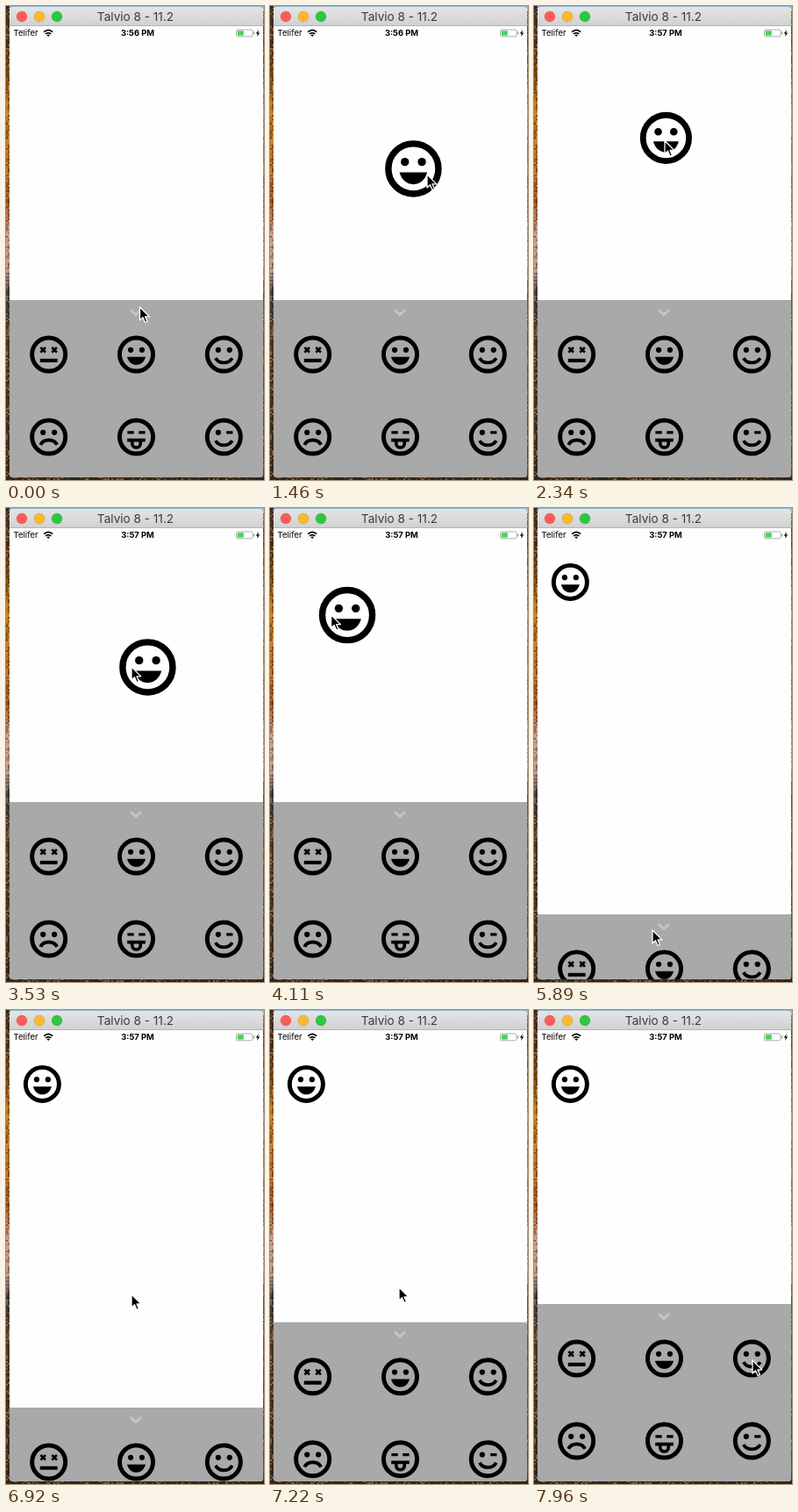
Write an HTML page that moves like this. It is 294 px wide and 540 px high and loops after 8000 ms.

```html
<!DOCTYPE html>
<html lang="en">
<head>
<meta charset="utf-8">
<title>Emoji canvas</title>
<style>
  html, body { margin: 0; width: 100%; height: 100%; overflow: hidden; }
  svg { display: block; width: 100vw; height: 100vh; }
  text { font-family: Inter, "Open Sans", sans-serif; }
  .line { fill: none; stroke: #000; }
  .button { stroke: rgba(0, 0, 0, .14); stroke-width: .8; }
</style>
</head>
<body>
<svg viewBox="0 0 294 540">
  <defs>
    <linearGradient id="desk" x2="0" y2="1">
      <stop offset="0" stop-color="#3a2c24"/>
      <stop offset=".12" stop-color="#6b4218"/>
      <stop offset=".22" stop-color="#c98220"/>
      <stop offset=".42" stop-color="#b0602a"/>
      <stop offset=".48" stop-color="#d3a896"/>
      <stop offset=".56" stop-color="#c4a093"/>
      <stop offset=".6" stop-color="#45434a"/>
      <stop offset=".7" stop-color="#5a4228"/>
      <stop offset="1" stop-color="#38291d"/>
    </linearGradient>
    <linearGradient id="bar" x2="0" y2="1">
      <stop offset="0" stop-color="#e5e5e5"/>
      <stop offset="1" stop-color="#d0d0d0"/>
    </linearGradient>
    <clipPath id="screen"><path d="M4 23H293.3V533Q293.3 537 289.3 537H8Q4 537 4 533Z"/></clipPath>

    <!-- Faces are drawn on a grid where the outer radius is 10 -->
    <circle id="ring" class="line" r="8.85" stroke-width="2.3"/>
    <circle id="eye" cy="-2.4" r="1.45"/>
    <g id="eyes"><use href="#eye" x="-3"/><use href="#eye" x="3"/></g>
    <path id="cross" class="line" d="M-1.3-3.7l2.6 2.6m0-2.6l-2.6 2.6" stroke-width="1.25"/>
    <path id="dash" class="line" d="M-1.7-2.4H1.7" stroke-width="1.5"/>
    <path id="curve" class="line" d="M-4.4 1.9C-2.6 5.2 2.6 5.2 4.4 1.9" stroke-width="1.8"/>

    <g id="dead"><use href="#ring"/><use href="#cross" x="-3"/><use href="#cross" x="3"/>
      <path class="line" d="M-4.6 3.2H4.6" stroke-width="1.9"/></g>
    <g id="happy"><use href="#ring"/><use href="#eyes"/>
      <path d="M-4.9 1.3H4.9C4.2 4 2.3 5.5 0 5.5S-4.2 4-4.9 1.3Z"/></g>
    <g id="smile"><use href="#ring"/><use href="#eyes"/><use href="#curve"/></g>
    <g id="sad"><use href="#ring"/><use href="#eyes"/>
      <use href="#curve" transform="translate(0 6) scale(1 -1)"/></g>
    <g id="tongue"><use href="#ring"/><use href="#dash" x="-3"/><use href="#dash" x="3"/>
      <path class="line" d="M-4.8 1.7H4.8M-2.2 2V3.4A2.2 2.2 0 0 0 2.2 3.4V2" stroke-width="1.7"/></g>
    <g id="wink"><use href="#ring"/><use href="#eye" x="-3"/><use href="#dash" x="3"/>
      <use href="#curve"/></g>
  </defs>

  <rect width="294" height="540" fill="url(#desk)"/>
  <g id="grain"></g>
  <rect x="4" width="290" height="6" fill="#8fb4cf"/>
  <path d="M4 23V5Q4 1 8 1H289.3Q293.3 1 293.3 5V23Z" fill="url(#bar)"/>
  <rect x="4" y="22" width="289.3" height="1" fill="#b5b5b5"/>
  <g class="button">
    <circle cx="18" cy="12" r="6" fill="#fc5b57"/>
    <circle cx="38" cy="12" r="6" fill="#fdb82f"/>
    <circle cx="58" cy="12" r="6" fill="#2bc840"/>
  </g>
  <text x="147.5" y="17" font-size="13.6" text-anchor="middle" fill="#3b3b3b">Talvio 8 - 11.2</text>

  <g clip-path="url(#screen)">
    <rect x="4" y="23" width="289.3" height="514" fill="#fefefe"/>
    <g id="tray">
      <rect x="4" width="289.3" height="205" fill="#a9a9a9"/>
      <path d="M142 11L148 16.6L154 11" fill="none" stroke="#c4c4c4" stroke-width="3"/>
    </g>
    <use id="face" href="#happy"/>
  </g>

  <text x="8.5" y="34" font-size="9.6">Telifer</text>
  <path class="line" d="M43.2 29.7Q48.2 25.2 53.2 29.7M45.1 31.9Q48.2 29.2 51.3 31.9" stroke-width="1.7"/>
  <path d="M46.4 33.2Q48.2 31.8 50 33.2L48.2 35Z"/>
  <text id="clock" x="150" y="34" font-size="9.4" font-weight="700" text-anchor="middle">3:56 PM</text>
  <rect x="262.5" y="27" width="18.5" height="7.8" rx="1.5" fill="none" stroke="#999" stroke-width=".8"/>
  <rect x="263.8" y="28.2" width="7" height="5.4" fill="#3fd957"/>
  <rect x="282" y="29.4" width="1.2" height="3" fill="#999"/>
  <path d="M288 27L284.8 31.4H286.8L286 35L289.2 30.4H287.2Z"/>

  <path id="cursor" d="M0 0V14.2L3.3 11.1L5.7 16.5L8 15.5L5.7 10.3H10.2Z"
    stroke="#fff" stroke-width="1.2" stroke-linejoin="round"/>
</svg>
<script>
const LOOP = 8000, STEP = 147.4, UNIT = 2.15;
const TRAY_UP = 335, TRAY_DROP = 123;
const $ = id => document.getElementById(id);
const clamp = v => Math.max(0, Math.min(1, v));

// Pointer moves, timed in steps; between them it rests
const start = { x: 152.5, y: 343 };
const moves = [
  { from: 0, to: 2, x: 159, y: 398 },                  // to the tray face
  { from: 2, to: 8, x: 137, y: 163, bowX: -14 },       // carry it up
  { from: 9, to: 10, x: 179, y: 192 },
  { from: 10, to: 15, x: 166, y: 157, swing: 48, bowY: 78 },
  { from: 15, to: 17, x: 132, y: 150 },
  { from: 19, to: 24, x: 143, y: 181, bowX: 12, bowY: 12 },
  { from: 24, to: 31, x: 23, y: 84 },                  // into the corner
  { from: 31, to: 32, x: 40, y: 73 },
  { from: 32, to: 34, x: 134, y: 382 },
  { from: 35, to: 37, x: 137, y: 366 },
  { from: 38, to: 39, x: 139, y: 353 },
  { from: 39, to: 40, x: 135, y: 481 },                // pull the tray down
  { from: 40, to: 42, x: 141, y: 464 },
  { from: 43, to: 47, x: 143, y: 324 },                // flick it up
  { from: 47, to: 51, x: 151, y: 336, bowY: -14 },
  { from: 51, to: 54, x: 249, y: 399 }
];

// Face drags, with the pointer's offset from the face centre
const drags = [
  { from: 3, to: 8, dx: 11, dy: 1, grow: 0 },
  { from: 10, to: 15, dx: 15.6, dy: 6.6, grow: 0.5 },
  { from: 20, to: 31, dx: -18.4, dy: -0.4, grow: 0.5 }
];

function pointer(n) {
  let { x, y } = start;
  for (const m of moves) {
    if (n <= m.from) break;
    const p = clamp((n - m.from) / (m.to - m.from));
    const ease = (1 - Math.cos(Math.PI * p)) / 2, arc = Math.sin(Math.PI * p);
    x += (m.x - x) * ease + (m.bowX || 0) * arc + (m.swing || 0) * Math.sin(2 * Math.PI * p);
    y += (m.y - y) * ease + (m.bowY || 0) * arc;
  }
  return { x, y };
}

// Springs down, then eases back up
function trayTop(n) {
  const fall = Math.max(0, n - 39), p = clamp((n - 46) / 4.6);
  const down = 1 - Math.exp(-3 * fall) * Math.cos(2.5 * fall);
  const up = p < 0.5 ? 4 * p ** 3 : 1 - 4 * (1 - p) ** 3;
  return TRAY_UP + TRAY_DROP * down * (1 - up);
}

function place(id, x, y, scale = 1) {
  $(id).setAttribute("transform", `translate(${x} ${y}) scale(${scale})`);
}

function draw(time) {
  const n = Math.floor(time / STEP + 0.2);
  const tip = pointer(n);
  place("cursor", tip.x, tip.y, 1.06);
  place("tray", 0, trayTop(n));
  $("clock").textContent = n < 14 ? "3:56 PM" : "3:57 PM";

  const drag = drags.filter(d => d.from <= n).pop();
  $("face").setAttribute("visibility", drag ? "visible" : "hidden");
  if (drag) {
    const held = pointer(Math.min(n, drag.to));
    const released = clamp((n - drag.to) / 2);
    const size = 1 + drag.grow * (1 - released ** 2);
    place("face", held.x - drag.dx, held.y - drag.dy, UNIT * size);
  }
}

function add(parent, tag, attrs) {
  const node = document.createElementNS("http://www.w3.org/2000/svg", tag);
  for (const key in attrs) node.setAttribute(key, attrs[key]);
  $(parent).append(node);
}

["dead", "happy", "smile", "sad", "tongue", "wink"].forEach((name, i) => {
  const x = 48.7 + 99.8 * (i % 3), y = 62 + 94 * Math.floor(i / 3);
  add("tray", "use", { href: "#" + name, transform: `translate(${x} ${y}) scale(${UNIT})` });
});

// Rough leaf texture where the desktop shows around the window
let seed = 7;
const random = () => (seed = seed * 16807 % 2147483647) / 2147483647;
function speck(x, y) {
  add("grain", "rect", {
    x, y, width: 2, height: 2, fill: random() < 0.7 ? "#1c1510" : "#d9a05a", opacity: random() * 0.5
  });
}
for (let y = 0; y < 540; y += 2) [0, 2, 292].forEach(x => speck(x, y));
for (let x = 4; x < 292; x += 2) [536, 538].forEach(y => speck(x, y));

const begin = performance.now();
function tick() {
  draw((performance.now() - begin) % LOOP);
  requestAnimationFrame(tick);
}
tick();
</script>
</body>
</html>
```
